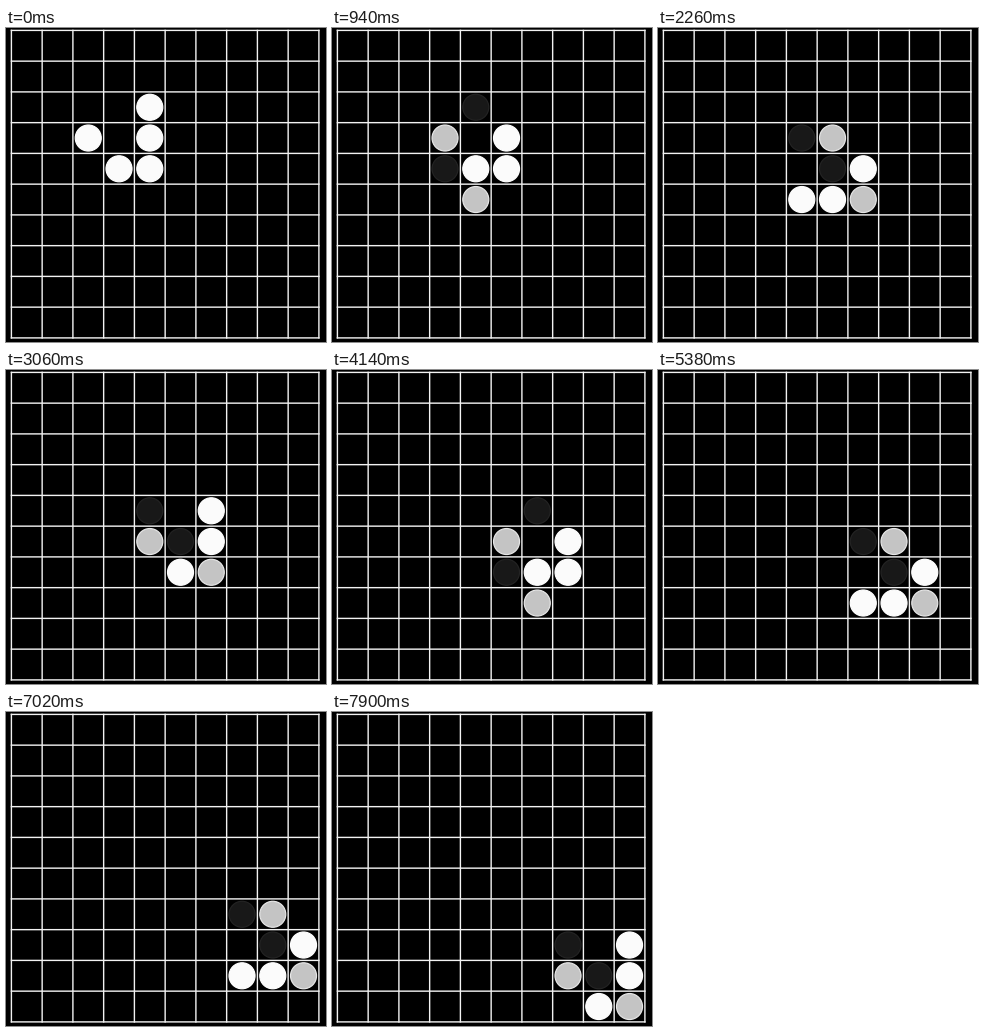
Recreate the animation shown at these times as a matplotlib script. Size 320 by 314 pixels, loop 8 s.

```python
import numpy as np
import matplotlib.pyplot as plt
from matplotlib.animation import FuncAnimation
from matplotlib.patches import Circle

W, H, DPI = 320, 314, 100
PX = 72 / DPI                      # one pixel in points
N, PITCH, X0, Y0 = 10, 30.75, 5.4, 2.4
RADIUS = 13
STEP, LOOP = 20, 8000              # ms

# Moments at which the next generation appears
TICKS = [500, 700, 940, 1380, 1740, 2260, 2580, 3060, 3460, 3780, 4140,
         4620, 4980, 5380, 5740, 6060, 6540, 7020, 7380, 7900]

# (fill, rim) by cell state
ALIVE = ("#fbfbfb", "#ffffff")
BORN = ("#c4c4c4", "#e6e6e6")
DYING = ("#181818", "#232323")


def evolve(grid):
    """One generation of the Game of Life on a bounded board."""
    p = np.pad(grid.astype(int), 1)
    near = sum(p[1 + dy:N + 1 + dy, 1 + dx:N + 1 + dx]
               for dy in (-1, 0, 1) for dx in (-1, 0, 1) if dx or dy)
    return (near == 3) | (grid & (near == 2))


start = np.zeros((N, N), bool)
for row, col in [(2, 4), (3, 2), (3, 4), (4, 3), (4, 4)]:
    start[row, col] = True
history = [start]
for _ in TICKS:
    history.append(evolve(history[-1]))

fig = plt.figure(figsize=(W / DPI, H / DPI), dpi=DPI, facecolor="black")
ax = fig.add_axes([0, 0, 1, 1])
ax.set_xlim(0, W)
ax.set_ylim(H, 0)
ax.axis("off")

line = dict(color="#f2f2f2", lw=1.4 * PX, snap=False, solid_capstyle="projecting")
for k in range(N + 1):
    x, y = X0 + k * PITCH, Y0 + k * PITCH
    ax.plot([x, x], [Y0, Y0 + N * PITCH], **line)
    ax.plot([X0, X0 + N * PITCH], [y, y], **line)

discs = {}
for row, col in np.ndindex(N, N):
    center = (X0 + (col + 0.5) * PITCH, Y0 + (row + 0.5) * PITCH)
    discs[row, col] = ax.add_patch(
        Circle(center, RADIUS, lw=1.2 * PX, visible=False, zorder=3))


def update(i):
    gen = int(np.searchsorted(TICKS, i * STEP, side="right"))
    now, before = history[gen], history[max(gen - 1, 0)]
    for cell, disc in discs.items():
        disc.set_visible(bool(now[cell] or before[cell]))
        if now[cell]:
            fill, rim = ALIVE if before[cell] else BORN
        else:
            fill, rim = DYING
        disc.set_facecolor(fill)
        disc.set_edgecolor(rim)
    return list(discs.values())


anim = FuncAnimation(fig, update, frames=LOOP // STEP, interval=STEP,
                     repeat=True, repeat_delay=0)
plt.show()
```
